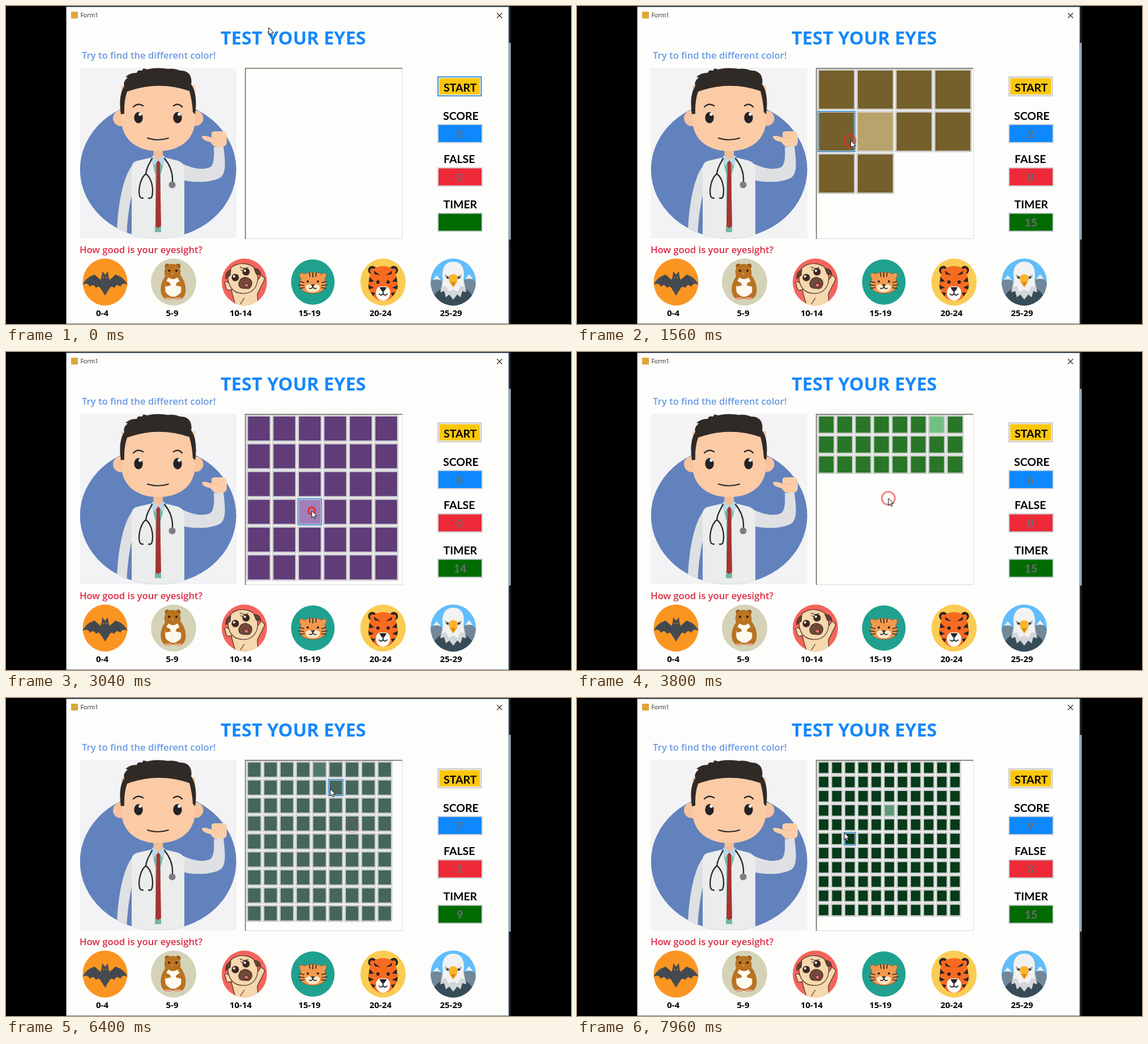
An HTML page with a canvas for the animation above (8000 ms loop, 998 px wide and 561 px high).

```html
<!DOCTYPE html>
<html lang="en">
<head>
<meta charset="utf-8">
<title>Test your eyes</title>
<style>
  html, body { margin: 0; width: 100%; height: 100%; overflow: hidden; background: #000; }
  svg, canvas { position: absolute; left: 0; top: 0; width: 998px; height: 561px; }
  text { font-family: "Open Sans", "Noto Sans", sans-serif; }
  .caps text { font: 700 19.5px Lato, sans-serif; }
  .value { fill: #6b6d70; text-anchor: middle; }
  .range text { font-weight: 700; font-size: 15px; text-anchor: middle; }
  .line { fill: none; stroke: #2b2828; stroke-linecap: round; stroke-linejoin: round; }
</style>
</head>
<body>
<svg viewBox="0 0 998 561">
  <defs>
    <clipPath id="disc"><ellipse cx="268.700" cy="288.500" rx="138" ry="121.500"/></clipPath>
    <clipPath id="badge"><ellipse rx="40" ry="41.500"/></clipPath>
  </defs>

  <!-- window -->
  <path fill="#141c26" d="M106 0H892V561H106Z"/>
  <path fill="#9fb2c4" d="M888 65H891.500V412H888Z"/>
  <path fill="#fdfdfb" stroke="#75828e" d="M106.500 1.500H888V560.500H106.500Z"/>
  <path fill="#dca63c" d="M115 10H127V22H115Z"/>
  <text x="131.500" y="20" font-size="10.400" fill="#222">Form1</text>
  <path class="line" stroke-width="1.100" d="M867.500 12.500L876 21M876 12.500L867.500 21"/>
  <text x="379" y="68" font-size="32.500" font-weight="700" fill="#1488fb">TEST YOUR EYES</text>
  <g font-size="16.650" font-weight="600">
    <text x="134" y="93" fill="#6a9ae6">Try to find the different color!</text>
    <text x="130" y="436" fill="#dc2b45">How good is your eyesight?</text>
  </g>

  <!-- doctor -->
  <path fill="#f3f3f5" d="M130.500 109H407V410H130.500Z"/>
  <ellipse cx="268.700" cy="288.500" rx="138" ry="121.500" fill="#6282bd"/>
  <g clip-path="url(#disc)">
    <path fill="#dfe0e2" d="M228 277C209 290 196 350 196 410H213Q214 365 224 325Z"/>
    <path fill="#dfe0e3" d="M300 272C320 284 345 292 361 284Q369 278 367 249L384 247C387 272 390 295 378 303C362 312 332 312 312 307Z"/>
    <path fill="#ebecec" d="M222 410V284Q222 276 232 273L258 267H280L304 273Q315 277 315 286V410Z"/>
    <path fill="#76b6a7" d="M257 267H281L274 295V399H263V295Z"/>
    <path fill="#ebecec" d="M255 275L264 297V387H260ZM282 275L273 297V387H277Z"/>
    <path fill="#a83330" d="M264 272H274L272 281L274 388L268.500 392L264 388L266 281Z"/>
  </g>
  <path fill="#f3bf99" d="M260.500 250H277V267L269 273L260.500 267Z"/>
  <path fill="#b8d7ea" d="M260 263L269 272L262 282L255 270ZM278 263L269 272L276 282L283 270Z"/>
  <path class="line" stroke-width="2.300" d="M258 269C252 280 248 287 247 296C238 303 233 322 236 335Q237 339 242 339M247 296C257 303 261 322 258 335Q257 340 252 339M280 269C290 281 295 294 294 310"/>
  <circle cx="293.500" cy="315.500" r="6" fill="#7d7d83"/>
  <path fill="#fbcda8" d="M346 230Q350 227 363 232L363 224Q364 221 370 221H384Q390 222 390 230V241Q389 247 383 248H368Q364 244 361 240Q346 237 346 230Z"/>
  <path class="line" style="stroke:#efb28d" d="M363 232Q372 235 376 231"/>
  <g fill="#f8c49f"><circle cx="203" cy="198" r="14"/><circle cx="335" cy="198" r="13.500"/></g>
  <path fill="#fbcba6" d="M204 140H334V200C334 237 305 256 269 256S204 237 204 200Z"/>
  <path fill="#302a27" d="M203 191C200 170 201 154 209 141Q206 134 215 126L211 125Q220 117 231 118Q232 112 240 114L243 110Q250 113 253 111Q270 108 286 111Q297 109 308 114Q319 113 325 122Q329 130 327 138C336 150 337 172 334 191L330 187Q329 168 324 150Q269 131 214 151Q208 168 209 190Z"/>
  <path class="line" stroke-width="2.400" d="M225 178Q233 170 242 176M296 176Q304 170 311 178"/>
  <path class="line" stroke-width="2" d="M250 233Q269 239 287 233"/>
  <g fill="#242224"><ellipse cx="234" cy="197" rx="7.700" ry="10"/><ellipse cx="303" cy="197" rx="7.700" ry="10"/></g>
  <g fill="#fff"><circle cx="237" cy="191" r="2.800"/><circle cx="306" cy="191" r="2.800"/></g>

  <!-- bat -->
  <g transform="translate(175 487)">
    <ellipse rx="39.500" ry="41.500" fill="#fb9522"/>
    <g id="bat"><path fill="#464b52" d="M0-13L-5-19L-6-10L-8-4L-19-13Q-33-9-40 5Q-31 0-27 8Q-21 2-16 10Q-10 5-6 14L0 24Z"/>
      <path class="line" style="stroke:#34383e" stroke-width=".8" d="M-19-13L-27 8M-17-12L-16 10M-15-10L-6 14"/>
      <circle cx="-2.500" cy="-8" r="1" fill="#fb9522"/></g>
    <use href="#bat" transform="scale(-1 1)"/>
  </g>

  <!-- hamster -->
  <g transform="translate(296 487)">
    <ellipse rx="40" ry="41.500" fill="#d4d3b8"/>
    <circle cx="-11" cy="-28" r="4.500" fill="#9a5a1b"/><circle cx="8" cy="-28" r="4.500" fill="#9a5a1b"/>
    <path fill="#b97322" d="M-2-32C9-32 14-22 12-12C23 1 25 22 15 29H-16C-26 21-24 3-15-10C-19-22-13-32-2-32Z"/>
    <path fill="#fffaf0" d="M-9-8Q-1-2 7-8Q15 4 13 18Q-1 34-14 18Q-17 2-9-8Z"/>
    <path fill="#b97322" d="M-15-2Q-4 0-5 6L-14 8ZM14-2Q3 0 4 6L13 8Z"/>
    <path fill="#e5a183" d="M-15 27H-4V31H-15ZM2 27H13V31H2ZM-4-16H0L-2-13Z"/>
    <g fill="#2c1c12"><circle cx="-8" cy="-20" r="2"/><circle cx="5" cy="-20" r="2"/></g>
  </g>

  <!-- pug -->
  <g transform="translate(421 487)">
    <ellipse rx="40" ry="41.500" fill="#f4655c"/>
    <g clip-path="url(#badge)" stroke="#4c3027" stroke-width="1.200">
      <path fill="#f5d8ae" d="M-23 13Q-32 18-33 6Q-37 0-31-1L-21 7Q-2 24 15 7L27-8Q29-14 32-10Q38-8 34-1L23 21Q23 37 28 45H-14Q-20 28-23 13Z"/>
      <path fill="#f5d8ae" d="M-25-23C-15-37 16-36 22-17C28 4 16 21-2 20C-26 20-34-4-25-23Z"/>
      <path fill="#624136" d="M-24-22Q-34-18-33-6L-25-12ZM17-24Q28-24 29-13L21-14Z"/>
      <g transform="translate(2 -3)">
        <path fill="#71493a" d="M-12 5Q-8-7 2-5Q13-2 11 8Q8 17-2 14Q-12 15-12 5Z"/>
        <path fill="#f36f76" d="M-2 6H5V10Q2 14-2 10Z"/>
      </g>
      <path fill="none" d="M-8-27Q0-22 7-26M-7-22Q0-18 6-21M0 28L-7 39"/>
      <circle cx="-16" cy="-8" r="6" fill="#3c2824"/><circle cx="3" cy="-18" r="6" fill="#3c2824"/>
    </g>
    <g fill="#fff"><circle cx="-18" cy="-10" r="2"/><circle cx="1" cy="-20" r="2"/></g>
  </g>

  <!-- tiger cub -->
  <g transform="translate(542 487)">
    <ellipse rx="38.500" ry="40" fill="#20a18f"/>
    <g id="cub"><path fill="#f3994d" stroke="#7a4a26" stroke-width=".7" d="M0-17Q-9-18-15-14Q-22-19-24-13Q-24-9-21-6Q-27 6-19 14Q-12 20 0 20"/>
      <path fill="#fde6c8" d="M0 5Q-11 2-13 9Q-11 18 0 18Z"/>
      <path class="line" stroke-width="1.600" d="M0-16V-9M-6-16L-5-10M-23-1L-16 1M-25 5L-16 6M-23 11L-15 10M0 8Q-2 13-6 11"/>
      <circle cx="-9" cy="-1" r="2" fill="#222"/></g>
    <use href="#cub" transform="scale(-1 1)"/>
    <path fill="#333" d="M-4 4H4L0 9Z"/>
  </g>

  <!-- tiger -->
  <g transform="translate(666 487)">
    <ellipse rx="40" ry="41.500" fill="#fbcc54"/>
    <g id="tiger"><circle cx="-19" cy="-21" r="7.500" fill="#292526"/><circle cx="-19" cy="-20" r="4" fill="#f76b20"/>
      <path fill="#f76b20" d="M0-28C-17-28-24-18-25-2Q-28 8-23 17Q-17 28-8 32L0 33Z"/>
      <path fill="#fff" d="M0 8Q-8 6-12 14Q-14 25-8 30Q-4 33 0 33Z"/>
      <path fill="#292526" d="M-24-9L-16-1L-25 0ZM-26 5L-16 10L-25 13ZM-22 18L-14 19L-17 25ZM-16-20L-5-12L-15-14Z"/>
      <circle cx="-9" cy="0" r="3" fill="#292526"/>
      <path class="line" stroke-width="1.800" d="M0 16V21Q-4 25-7 21"/></g>
    <use href="#tiger" transform="scale(-1 1)"/>
    <path fill="#292526" d="M-6 9H6Q5 14 0 17Q-5 14-6 9Z"/>
  </g>

  <!-- eagle -->
  <g transform="translate(790 487)">
    <ellipse rx="40" ry="41.500" fill="#61bdfb"/>
    <g clip-path="url(#badge)">
      <path fill="#71879a" d="M-42 20V2L-29-12L-14 7L14 4L28-14L42 4V45H-42Z"/>
      <path fill="#e7f2f8" d="M-36-4L-29-12L-22-3L-28-5ZM21-5L28-14L35-5L28-6Z"/>
      <path fill="#384c57" d="M-42 45Q-35 15-17 11L0 20L17 11Q35 15 42 45Z"/>
    </g>
    <path fill="#d3d7da" d="M-18-6L-23 18L-16 16L-13 27L-7 22L0 31L7 22L13 27L16 16L23 18L18-6Z"/>
    <path fill="#f2f2f2" d="M0-36C-17-36-21-20-18-4L-19 9L-13 7L-8 17L0 13L8 17L13 7L19 9L18-4C21-20 17-36 0-36Z"/>
    <path fill="#a9b0b6" d="M-15-14L-5-8L-7-4L-14-8ZM15-14L5-8L7-4L14-8Z"/>
    <path fill="#fab52c" d="M-7-11Q0-17 7-11Q10 0 0 9Q-10 0-7-11Z"/>
    <path fill="#d88818" d="M-4 0H4L0 9Z"/>
    <g fill="#333"><circle cx="-10" cy="-8" r="2"/><circle cx="10" cy="-8" r="2"/></g>
  </g>

  <g class="range">
    <text x="170" y="547">0-4</text><text x="293.500" y="547">5-9</text>
    <text x="414.500" y="547">10-14</text><text x="536" y="547">15-19</text>
    <text x="661.500" y="547">20-24</text><text x="786" y="547">25-29</text>
  </g>

  <!-- board frame and side panel -->
  <path class="line" style="stroke:#d9dadc" d="M700.500 110V410.500H423"/>
  <path class="line" style="stroke:#7c7b73;stroke-width:1.800;stroke-linecap:butt" d="M422.800 411V109.800H700"/>
  <g class="caps" stroke-width="2">
    <rect id="start" x="763" y="125" width="76.500" height="33.500" fill="#eeeadb" stroke-width="1.600"/>
    <rect x="765.500" y="127.500" width="71.500" height="28.500" fill="#fcc70b"/>
    <g stroke="#cfd3d9">
      <rect x="763" y="209" width="78" height="32" fill="#0e88fd"/>
      <rect x="763" y="285.500" width="78" height="32" fill="#ee2a38"/>
      <rect x="763" y="365.500" width="78" height="32" fill="#006b00"/>
    </g>
    <text x="773" y="151">START</text><text x="772" y="201">SCORE</text>
    <text x="773" y="277">FALSE</text><text x="772.500" y="357">TIMER</text>
    <text class="value" id="score" x="801" y="233"/>
    <text class="value" id="wrong" x="801" y="309"/>
    <text class="value" id="timer" x="802" y="389"/>
  </g>
</svg>
<canvas id="stage" width="998" height="561"></canvas>

<script>
const LOOP = 8000, DELAY = 90, CELL_MS = 2.9, TICK = 260, RING_MS = 480;
const LEFT = 425, TOP = 111.4;
const $ = id => document.getElementById(id);
const ctx = $('stage').getContext('2d');

// click: when the round is opened; size: cell pitch; odd: column and row of the odd cell
const rounds = [
  { click: 520, size: [138, 150], odd: [0, 0], color: '#703b50', oddColor: '#b87f94' },
  { click: 960, size: [91.5, 100], odd: [0, 1], color: '#36558a', oddColor: '#7a98c9' },
  { click: 1440, size: [68.5, 74], odd: [1, 1], color: '#75602c', oddColor: '#b8a36d' },
  { click: 1900, size: [54, 58.7], odd: [0, 1], color: '#047657', oddColor: '#35a78b' },
  { click: 2370, size: [45, 49], odd: [2, 3], color: '#603d79', oddColor: '#a27fba' },
  { click: 3000, size: [38, 41], odd: [3, 3], color: '#205f72', oddColor: '#65a3b5' },
  { click: 3640, size: [32.5, 35.2], odd: [6, 0], color: '#2a7629', oddColor: '#72c083' },
  { click: 4450, size: [28.8, 31.7], odd: [4, 0], color: '#47665b', oddColor: '#53796e' },
  { click: 6590, size: [26, 28], odd: [1, 4], color: '#873751', oddColor: '#d78ba1' },
  { click: 7400, size: [23.2, 25.1], odd: [5, 3], color: '#063a19', oddColor: '#609777' }
];
const misses = [4860, 5640, 6060];
const clicks = [...rounds.map(r => r.click), ...misses];

// cursor stops: time, x, y
const path = [
  [40, 464, 38], [500, 800, 146], [600, 800, 146], [930, 509, 153], [1060, 509, 153],
  [1400, 482, 238], [1520, 482, 238], [1850, 520, 220], [1960, 520, 220],
  [2300, 469, 207], [2480, 469, 207], [2930, 540, 280], [3080, 540, 280],
  [3570, 550, 258], [3850, 550, 258], [4380, 635, 130], [4520, 635, 130],
  [4820, 582, 254], [5290, 582, 254], [5360, 563, 256], [5600, 520, 300],
  [5690, 520, 300], [6020, 612, 226], [6110, 612, 226], [6540, 560, 139],
  [6800, 560, 139], [6980, 545, 135], [7050, 545, 135], [7370, 463, 238],
  [7600, 463, 238], [7800, 472, 237.5]
];

function cursorAt(t) {
  const i = path.findIndex(p => p[0] > t);
  if (i === 0) return path[0].slice(1);
  if (i < 0) return path.at(-1).slice(1);
  const [t0, x0, y0] = path[i - 1], [t1, x1, y1] = path[i];
  const u = (t - t0) / (t1 - t0), e = u * u * (3 - 2 * u);
  return [x0 + (x1 - x0) * e, y0 + (y1 - y0) * e];
}

function drawBoard(t, level) {
  const { click, size: [w, h], odd, color, oddColor } = rounds[level];
  const n = level + 2;
  const count = Math.min(n * n, Math.floor((t - click - DELAY) / CELL_MS));
  const [cx, cy] = cursorAt(t - 40);
  const hoverCol = Math.floor((cx - LEFT) / w), hoverRow = Math.floor((cy - TOP) / h);
  for (let i = 0; i < count; i++) {
    const col = i % n, row = Math.floor(i / n);
    const x = LEFT + col * w, y = TOP + row * h;
    const hover = col === hoverCol && row === hoverRow;
    ctx.fillStyle = '#eeeeee';
    ctx.fillRect(x, y, w - 2, h - 2);
    ctx.strokeStyle = hover ? '#2484cf' : '#b2b2b4';
    ctx.lineWidth = hover ? 1.6 : 1;
    ctx.strokeRect(x + .5, y + .5, w - 3, h - 3);
    ctx.fillStyle = col === odd[0] && row === odd[1] ? oddColor : color;
    ctx.fillRect(x + 2.3, y + 2.3, w - 6.4, h - 6.4);
  }
}

function drawRing(t, click) {
  const age = t - click;
  if (age < 0 || age > RING_MS) return;
  const [x, y] = cursorAt(click);
  ctx.globalAlpha = Math.min(1, 1.6 * Math.exp(-age / 150));
  ctx.strokeStyle = '#ea2b30';
  ctx.lineWidth = 3.2;
  ctx.beginPath();
  ctx.arc(x, y, Math.min(11.5, 4 + age * .047), 0, 7);
  ctx.stroke();
  ctx.globalAlpha = 1;
}

const arrow = new Path2D('M0 0V12.500L3 9.800L5 14.300L7 13.400L5 9.200H9Z');
function drawCursor(t) {
  ctx.save();
  ctx.translate(...cursorAt(t));
  ctx.fillStyle = '#fff';
  ctx.strokeStyle = '#111';
  ctx.lineWidth = 1;
  ctx.fill(arrow);
  ctx.stroke(arrow);
  ctx.restore();
}

function timerText(t, level) {
  if (level < 1) return '';
  const filled = rounds[level].click + DELAY + (level + 2) ** 2 * CELL_MS;
  return 15 - Math.max(0, Math.floor((t - filled) / TICK));
}

function draw(now) {
  const t = now % LOOP;
  const level = rounds.filter(r => t >= r.click + DELAY).length - 1;
  ctx.clearRect(0, 0, 998, 561);
  if (level >= 0) drawBoard(t, level);
  clicks.forEach(click => drawRing(t, click));
  drawCursor(t);
  $('start').setAttribute('stroke', level < 0 ? '#1d80d4' : '#c4c5c7');
  $('score').textContent = Math.max(0, level);
  $('wrong').textContent = misses.filter(m => t >= m + DELAY).length;
  $('timer').textContent = timerText(t, level);
  requestAnimationFrame(draw);
}
requestAnimationFrame(draw);
</script>
</body>
</html>
```
